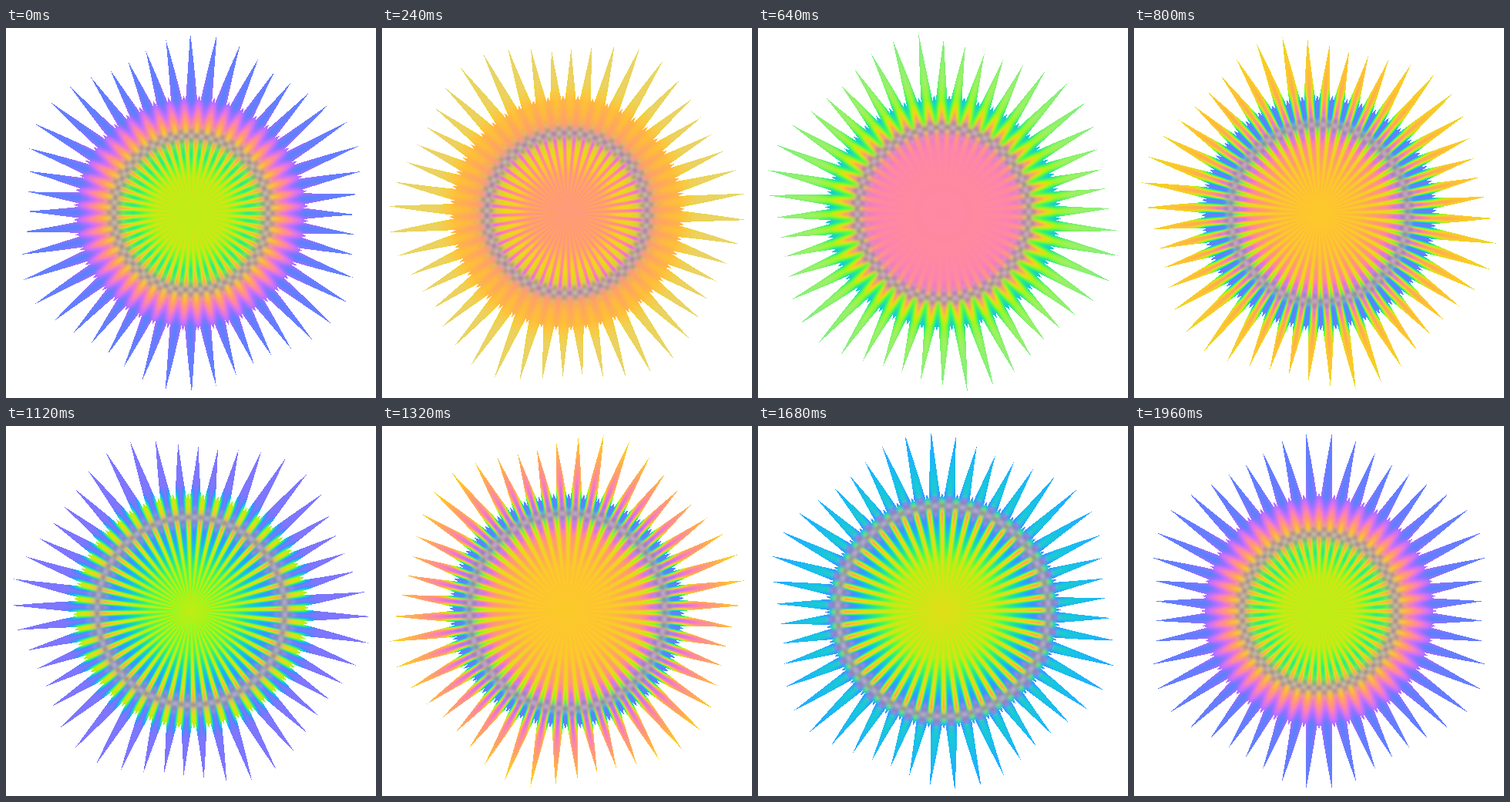
An HTML page with a canvas for the animation above (2000 ms loop, 480 px wide and 480 px high).

```html
<!DOCTYPE html>
<html lang="en">
<head>
<meta charset="utf-8">
<title>Spinning rainbow starburst</title>
<style>
  html, body { margin: 0; width: 100%; height: 100%; overflow: hidden; background: #fff; }
  canvas { display: block; width: 480px; height: 480px; }
</style>
</head>
<body>
<canvas id="stage" width="480" height="480"></canvas>
<script>
const SIZE = 480, CENTER = 240, STEP = 40, STEPS = 50;
const RIM = 140, MAX_R = 238, TAU = Math.PI * 2, DEG = Math.PI / 180;

const ctx = document.getElementById("stage").getContext("2d");
const image = ctx.createImageData(SIZE, SIZE);
const pixels = new Uint32Array(image.data.buffer);

const mix = (a, b, t) => a + (b - a) * t;
const clamp = (v, lo, hi) => Math.min(hi, Math.max(lo, v));
const wave = x => Math.cos(TAU * x);
const pack = (r, g, b) =>
  (255 << 24 | clamp(b, 0, 255) << 16 | clamp(g, 0, 255) << 8 | clamp(r, 0, 255)) >>> 0;

// Bright cyclic palette: gold, pink, violet, blue, cyan, lime.
const palette = Array.from({ length: 1024 }, (_, i) => {
  const h = i / 1024;
  return [
    .58 + .48 * wave(h - .09),
    .71 + .27 * wave(h + .2),
    .63 + .55 * wave(h - .41)
  ].map(v => clamp(v * 255, 0, 255));
});

// Hues from the core outwards along the spike and valley axes;
// haze is how far the spikes fade to pale grey.
const moods = [
  { at: 0,  core: .90,  haze: 0,  spike: [.88, .68, .75, 1.12, 1.42, 1.4],  valley: [.94, 1.0, 1.08, 1.0, 1.3, 1.25] },
  { at: 12, core: 1.33, haze: .7, spike: [1.27, 1.21, 1.12, 1.0, .62, .55], valley: [1.33, 1.36, 1.42, 1.22, .8, .55] },
  { at: 20, core: 1.0,  haze: 0,  spike: [1.05, 1.15, 1.3, 1.28, 1.1, .96], valley: [.99, .95, .8, .38, .37, .75] },
  { at: 28, core: .90,  haze: 0,  spike: [.74, .52, .40, .37, .37, .37],    valley: [.92, .98, 1.08, 1.0, .93, .37] },
  { at: 33, core: 1.0,  haze: 0,  spike: [1.03, 1.12, 1.3, 1.36, 1.28, .98], valley: [.99, .95, .8, .38, .37, .8] },
  { at: 42, core: .95,  haze: 0,  spike: [.86, .58, .38, .37, .62, .52],    valley: [.95, 1.0, 1.1, .6, .4, .53] }
];
moods.push({ ...moods[0], at: 49 });

const radius = new Float32Array(SIZE * SIZE);
const angle = new Float32Array(SIZE * SIZE);
for (let i = 0; i < radius.length; i++) {
  const x = i % SIZE + .5 - CENTER, y = Math.floor(i / SIZE) + .5 - CENTER;
  radius[i] = Math.hypot(x, y);
  angle[i] = Math.atan2(x, -y) / DEG;
}

function moodAt(step) {
  let i = 0;
  while (i < moods.length - 2 && moods[i + 1].at <= step) i++;
  const a = moods[i], b = moods[i + 1], t = (step - a.at) / (b.at - a.at);
  const blend = key => a[key].map((v, j) => mix(v, b[key][j], t));
  return {
    core: mix(a.core, b.core, t),
    haze: mix(a.haze, b.haze, t),
    spike: blend("spike"),
    valley: blend("valley")
  };
}

function profile(core, hues, ring, outer) {
  const stops = [0, ring * .45, ring * .75, ring * .92, ring * 1.08, Math.max(148, ring * 1.1), outer];
  const values = [core, ...hues];
  return Float32Array.from({ length: MAX_R + 1 }, (_, r) => {
    let i = 0;
    while (i < stops.length - 2 && stops[i + 1] < r) i++;
    return mix(values[i], values[i + 1], clamp((r - stops[i]) / (stops[i + 1] - stops[i]), 0, 1));
  });
}

function inside(r, u, off) {
  if (r < RIM) return true;
  const tip = 224 + 11 * Math.cos(6 * u * DEG);
  const spike = .87 * (tip - r) / (tip - RIM) * RIM / r;
  const sprout = .45 * (153 - r) / 13;
  return off < spike || 1 - off < sprout;
}

function draw(step) {
  const mood = moodAt(step);
  const ring = 100 / (1 - .0064 * (step % 49));
  const spin = 4 - 16 * step;
  const spikeHue = profile(mood.core, mood.spike, ring, 225);
  const valleyHue = profile(mood.core, mood.valley, ring, 166);

  for (let i = 0; i < pixels.length; i++) {
    const r = radius[i];
    pixels[i] = 0xffffffff;
    if (r > MAX_R) continue;

    const u = angle[i] - spin;
    const lean = r > RIM ? Math.sin(6 * u * DEG) * (r - RIM) / 82 : 0;
    const turn = (u - lean) / 7.5;
    const off = Math.abs(turn - Math.floor(turn) - .5) * 2;
    if (!inside(r, u, off)) continue;

    const q = Math.round(r);
    const cells = Math.cos(Math.PI * off);
    const weight = Math.pow((1 - cells) / 2, r < ring ? 1.5 : 1);
    const hue = mix(spikeHue[q], valleyHue[q], weight);
    const [red, green, blue] = palette[Math.floor((hue - Math.floor(hue)) * 1024) & 1023];

    // Grey lens-shaped cells soften the colours around the ring.
    const d = r - ring, width = 9 + 3 * cells;
    const grey = .85 * Math.exp(-d * d / (width * width));
    const shade = 18 * Math.cos(d * .5) * cells;
    const pale = mood.haze * clamp((r - 145) / 25, 0, 1) * (1 - off);
    const tone = (value, ringTone, paleTone) =>
      mix(mix(value, ringTone + shade, grey), paleTone, pale);
    pixels[i] = pack(tone(red, 172, 210), tone(green, 157, 222), tone(blue, 175, 225));
  }
  ctx.putImageData(image, 0, 0);
}

const start = performance.now();
let shown = -1;
function tick() {
  const step = Math.floor((performance.now() - start) / STEP) % STEPS;
  if (step !== shown) draw(shown = step);
  requestAnimationFrame(tick);
}
tick();
</script>
</body>
</html>
```
